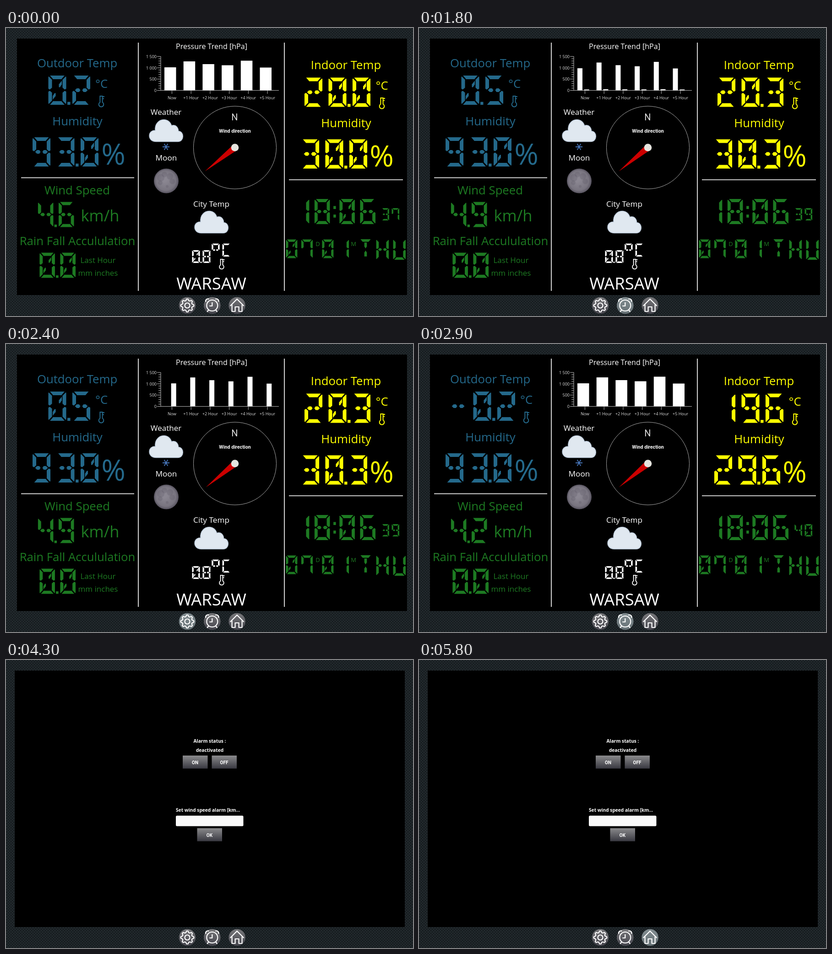
These frames come from a looping animation (889x630 px, 8 s). An HTML page with a canvas:

```html
<!DOCTYPE html>
<html lang="en">
<head>
<meta charset="utf-8">
<title>Weather station</title>
<style>
html, body { margin: 0; width: 100%; height: 100%; overflow: hidden; background: #1b2225; }
canvas { display: block; }
</style>
</head>
<body>
<canvas id="stage" width="889" height="630"></canvas>
<script>
const ctx = document.getElementById('stage').getContext('2d');
const LOOP = 8000;
const BLUE = '#24698b', GREEN = '#1d7a22', YELLOW = '#ffff00', WHITE = '#ffffff';

// start time, outdoor, wind, indoor, indoor humidity, seconds
const READINGS = [
  [0, '0.2', '4.6', '20.0', '30.0', '37'],
  [700, '-0.2', '4.2', '19.6', '29.6', '38'],
  [1800, '0.5', '4.9', '20.3', '30.3', '39'],
  [2800, '-0.2', '4.2', '19.6', '29.6', '40']
];
// start time, hovered button (0 gear, 1 alarm, 2 home, -1 none)
const HOVER = [[0, -1], [800, 0], [1100, 1], [2300, 0], [2800, -1], [2900, 1], [3200, -1],
  [3800, 1], [4300, -1], [4400, 2], [4700, 1], [4800, 0], [4900, -1], [5000, 1], [5100, 2],
  [5400, 1], [5500, 0], [5800, 2]];
const at = (list, t) => list.filter(entry => entry[0] <= t).pop();

const SEGMENTS = {
  0: 'abcdefjk', 1: 'bc', 2: 'abged', 3: 'abgcd', 4: 'fgbc', 5: 'afgcd', 6: 'afgecd', 7: 'fabc',
  8: 'abcdefg', 9: 'abcdfg', '-': 'g', '°': 'abfg', C: 'adef', T: 'ail', H: 'bcefg', U: 'bcdef'
};

function text(str, x, y, size, color = WHITE, align = 'center', font = '"Open Sans"', weight = 400) {
  ctx.font = `${weight} ${size}px ${font}, sans-serif`;
  ctx.textAlign = align;
  ctx.fillStyle = color;
  ctx.fillText(str, x, y);
}

function rect(x, y, w, h, color) {
  ctx.fillStyle = color;
  ctx.fillRect(x, y, w, h);
}

function disc(x, y, r, color) {
  ctx.beginPath();
  ctx.arc(x, y, r, 0, 2 * Math.PI);
  ctx.fillStyle = color;
  ctx.fill();
}

function line(points, color, width = 1) {
  ctx.beginPath();
  points.forEach(p => ctx.lineTo(p[0], p[1]));
  ctx.strokeStyle = color;
  ctx.lineWidth = width;
  ctx.stroke();
}

function shade(y0, y1, top, bottom) {
  const g = ctx.createLinearGradient(0, y0, 0, y1);
  g.addColorStop(0, top);
  g.addColorStop(1, bottom);
  return g;
}

function glyph(ch, x, y, w, h) {
  const s = h * .125, m = h / 2, c = w / 2;
  const poly = (points, flipX, flipY) => {
    ctx.beginPath();
    points.forEach(([px, py]) => ctx.lineTo(x + (flipX ? w - px : px), y + (flipY ? h - py : py)));
    ctx.fill();
  };
  const bar = [[.45 * s, 0], [w - .45 * s, 0], [w - 1.3 * s, s], [1.3 * s, s]];
  const side = [[0, .3 * s], [.2 * s, .3 * s], [s, 1.15 * s], [s, m - .7 * s], [.4 * s, m - .15 * s], [0, m - .4 * s]];
  const half = [[.7 * s, m], [1.2 * s, m - .5 * s], [c - .6 * s, m - .5 * s], [c - .25 * s, m], [c - .6 * s, m + .5 * s], [1.2 * s, m + .5 * s]];
  const slash = [[w - 1.2 * s, 1.4 * s], [w - 1.2 * s, 2.4 * s], [w - 1.7 * s, m - .8 * s], [w - 2 * s, m - .8 * s], [w - 2 * s, 2.4 * s]];
  const stem = [[c - .5 * s, 1.3 * s], [c + .5 * s, 1.3 * s], [c + .5 * s, m - 1.2 * s], [c, m - .4 * s], [c - .5 * s, m - 1.2 * s]];
  const draw = {
    a: () => poly(bar), d: () => poly(bar, 0, 1),
    f: () => poly(side), b: () => poly(side, 1), e: () => poly(side, 0, 1), c: () => poly(side, 1, 1),
    g: () => { poly(half); poly(half, 1); },
    j: () => poly(slash), k: () => poly(slash, 1, 1),
    i: () => poly(stem), l: () => poly(stem, 0, 1)
  };
  for (const seg of SEGMENTS[ch]) draw[seg]();
}

// Segment text, laid out from its right edge; dots and colons sit between cells.
function led(str, right, y, h, color) {
  const w = h * .61, pitch = h * .82, dot = h * .1;
  ctx.fillStyle = color;
  let x = right - w;
  for (const ch of [...str].reverse()) {
    if (ch === '.') {
      ctx.fillRect(x + w + dot * .4, y + h - dot, dot, dot);
    } else if (ch === ':') {
      x -= h * .17;
      for (const k of [.28, .62]) ctx.fillRect(x + w + dot * 1.4, y + h * k, dot, dot * 1.2);
    } else {
      glyph(ch, x, y, w, h);
      x -= pitch;
    }
  }
}

function thermometer(x, y, color, scale = 1) {
  ctx.save();
  ctx.translate(x, y);
  ctx.scale(scale, scale);
  ctx.strokeStyle = color;
  ctx.lineWidth = 2;
  ctx.stroke(new Path2D('M-2.6 2.5V-11H2.6V2.5A5.3 5.3 0 1 1 -2.6 2.5ZM3 -10H7M3 -5.5H6'));
  ctx.restore();
}

function cloud(x, y) {
  ctx.save();
  ctx.translate(x, y);
  const shape = new Path2D('M14 48C-5 48 -5 23 12.5 23.5C11 8 22 0 31 0C40 0 46 6 48 13C58 10 63 18 63 25C76.5 26 76 48 62 48Z');
  ctx.fillStyle = '#e0e8f0';
  ctx.fill(shape);
  ctx.strokeStyle = '#bccada';
  ctx.lineWidth = 1.5;
  ctx.stroke(shape);
  ctx.restore();
}

function moon(x, y) {
  const g = ctx.createRadialGradient(x - 4, y - 4, 6, x, y, 27);
  g.addColorStop(0, '#8a8691');
  g.addColorStop(.75, '#78747f');
  g.addColorStop(1, '#57535f');
  disc(x, y, 27, g);
  for (const [dx, dy, r] of [[-12, -7, 8], [-4, -14, 6], [8, -10, 7], [13, 1, 6], [-13, 4, 5], [2, 12, 3]])
    disc(x + dx, y + dy, r, 'rgba(82,78,92,.22)');
}

const easeBoth = t => t <= 0 ? 0 : t >= 1 ? 1 :
  t < .2 ? 3.125 * t * t : t > .8 ? 1 - 3.125 * (1 - t) ** 2 : 1.25 * t - .125;

function chart(t) {
  text('Pressure Trend [hPa]', 449, 46, 16.1);
  for (let i = 0; i <= 15; i++) {
    const y = 136.5 - i * 4.95;
    line([[i % 5 ? 333 : 330, y], [338, y]], '#bbb');
  }
  ['0', '500', '1 000', '1 500'].forEach((s, i) => text(s, 329, 140 - i * 24.7, 9, '#ddd', 'right'));
  const grown = easeBoth((t - 1721) / 700);
  const values = [50.5, 63.5, 57.5, 55, 65, 50];
  values.forEach((v, i) => {
    const x = 346 + i * 41.7;
    const column = (dx, w, height) => rect(x + dx, 136.5 - height, w, height, WHITE);
    if (t < 1800 || t >= 2500) column(0, 25.5, v);
    else {
      if (t < 2400) column(0, 11, v * (1 - grown));
      column(14.7, 11, v * grown);
    }
    line([[x + 16.5, 137], [x + 16.5, 144]], '#bbb');
    text(i ? `+${i} Hour` : 'Now', x + 16.5, 156, 9, '#ddd');
  });
  line([[338, 62], [338, 136.5], [596, 136.5]], '#bbb');
}

function compass(t) {
  ctx.beginPath();
  ctx.arc(500, 261.5, 90.5, 0, 2 * Math.PI);
  ctx.strokeStyle = '#aaa';
  ctx.lineWidth = 1;
  ctx.stroke();
  text('N', 499.5, 202, 20, '#ddd', 'center', 'Roboto');
  text('Wind direction', 500, 229, 10.7, WHITE, 'center', 'Roboto', 700);
  ctx.fillStyle = '#cc0000';
  ctx.beginPath();
  ctx.moveTo(t < 700 ? 434.5 : 436.5, 313.5);
  ctx.lineTo(495, 256.5);
  ctx.lineTo(504, 267.5);
  ctx.fill();
  disc(500, 261.5, 8.3, '#e6e5df');
}

function dashboard(t) {
  const [, outdoor, wind, indoor, humidity, seconds] = at(READINGS, t);
  rect(24, 23, 852, 561, '#000');
  rect(288, 32, 2, 543, '#d4d4d4');
  rect(607, 32, 2, 543, '#d4d4d4');
  rect(33, 326.5, 247, 2, '#d4d4d4');
  rect(618, 331, 249, 2, '#c8c8c8');

  const shift = outdoor[0] === '-' ? 26 : 0;
  text('Outdoor Temp', 155.5, 85.5, 25.7, BLUE);
  led(outdoor, 184 + shift, 104, 64, BLUE);
  text('°C', 208.5 + shift, 131, 25.7, BLUE);
  thermometer(208 + shift, 160, BLUE);
  text('Humidity', 156, 213, 25.7, BLUE);
  led('93.0', 202, 239, 64, BLUE);
  text('%', 234.5, 299, 64, BLUE);

  text('Indoor Temp', 742.5, 90, 25.7, YELLOW);
  led(indoor, 796, 108.5, 64, YELLOW);
  text('°C', 821, 135, 25.7, YELLOW);
  thermometer(821, 164, YELLOW);
  text('Humidity', 743, 217, 25.7, YELLOW);
  led(humidity, 789, 243.5, 64, YELLOW);
  text('%', 820.5, 303, 64, YELLOW);

  text('Wind Speed', 155.5, 364, 25.7, GREEN);
  led(wind, 148.5, 380.5, 55, GREEN);
  text('km/h', 205.5, 423, 34.5, GREEN);
  text('Rain Fall Accululation', 156, 475, 25.7, GREEN);
  led('0.0', 152, 491.5, 55, GREEN);
  text('Last Hour', 201, 514, 17, GREEN);
  text('mm inches', 201, 541.5, 17, GREEN);

  led('18:06', 807, 374, 55, GREEN);
  led(seconds, 859, 394, 27, GREEN);
  led('07', 670, 462.5, 41, GREEN);
  text('D', 681, 477, 13, GREEN);
  led('01', 749, 462.5, 41, GREEN);
  text('M', 759, 477, 13, GREEN);
  led('THU', 873, 462, 45, GREEN);

  chart(t);
  text('Weather', 349.5, 190, 17);
  cloud(313.5, 200.5);
  for (let a = 0; a < 3; a++) {
    const dx = 7.6 * Math.cos(a * Math.PI / 3), dy = 7.6 * Math.sin(a * Math.PI / 3);
    line([[349.5 - dx, 260 - dy], [349.5 + dx, 260 + dy]], '#4b7cc4', 1.8);
  }
  text('Moon', 350, 290, 17.2);
  moon(350, 334.5);
  compass(t);
  text('City Temp', 448.5, 390.5, 17.2);
  cloud(412.5, 400.5);
  led('0.8', 446.5, 486, 28, WHITE);
  led('°C', 490, 471.5, 28.5, WHITE);
  thermometer(471, 516, WHITE, .92);
  text('WARSAW', 448.5, 572, 36.3);
}

function button(label, x, y) {
  rect(x, y, 54.5, 28.5, shade(y, y + 28, '#8a8a8c', '#3a3a42'));
  text(label, x + 27, y + 18.5, 10, WHITE, 'center', 'Roboto', 700);
}

function alarmPage() {
  rect(19, 23, 852, 561, '#000');
  text('Alarm status :', 445, 180.5, 10.2, WHITE, 'center', '"Open Sans"', 700);
  text('deactivated', 445, 200.5, 10.2, WHITE, 'center', '"Open Sans"', 700);
  button('ON', 386, 209);
  button('OFF', 449.5, 209);
  text('Set wind speed alarm [km...', 371, 332, 10.2, WHITE, 'left', '"Open Sans"', 700);
  ctx.beginPath();
  ctx.roundRect(371, 340.5, 147.5, 23, 2.5);
  ctx.fillStyle = '#fafafa';
  ctx.fill();
  button('OK', 417.5, 368);
}

const gear = new Path2D();
for (let i = 0; i < 32; i++) {
  const a = (i - .5) * Math.PI / 16, r = i % 4 < 2 ? 14.3 : 11;
  gear.lineTo(r * Math.cos(a), r * Math.sin(a));
}
gear.closePath();
gear.moveTo(5.5, 0);
gear.arc(0, 0, 5.5, 0, 2 * Math.PI);
const ICONS = [
  gear,
  new Path2D('M12 0A12 12 0 1 1 -12 0A12 12 0 1 1 12 0M0 -7V1H-6M-14 -8A5 5 0 0 1 -7 -14M14 -8A5 5 0 0 0 7 -14M-8 10L-11 14M8 10L11 14'),
  new Path2D('M-15 1L0 -14L15 1M-11 -2V13H-4V3H4V13H11V-2')
];

function toolbar(hovered) {
  ICONS.forEach((icon, i) => {
    ctx.save();
    ctx.translate(396 + i * 54.3, 607);
    disc(0, 0, 18.3, i === hovered ? shade(-18, 18, '#818c90', '#687377') : shade(-18, 18, '#77777a', '#46464e'));
    ctx.strokeStyle = WHITE;
    ctx.lineWidth = 2.2;
    ctx.lineJoin = 'round';
    ctx.stroke(icon);
    ctx.restore();
  });
}

function weave() {
  const tile = document.createElement('canvas');
  tile.width = tile.height = 6;
  const c = tile.getContext('2d');
  c.fillStyle = '#151a1d';
  c.fillRect(0, 0, 6, 6);
  c.fillStyle = '#262e32';
  c.fillRect(0, 0, 4, 2);
  c.fillRect(3, 3, 3, 2);
  c.fillRect(0, 3, 1, 2);
  return ctx.createPattern(tile, 'repeat');
}
const carbon = weave();

function frame(now) {
  const t = Math.floor(now % LOOP / 100) * 100;
  rect(0, 0, 889, 630, carbon);
  if (t < 3400) dashboard(t);
  else alarmPage();
  toolbar(at(HOVER, t)[1]);
  requestAnimationFrame(() => frame(performance.now()));
}
frame(0);
</script>
</body>
</html>
```
